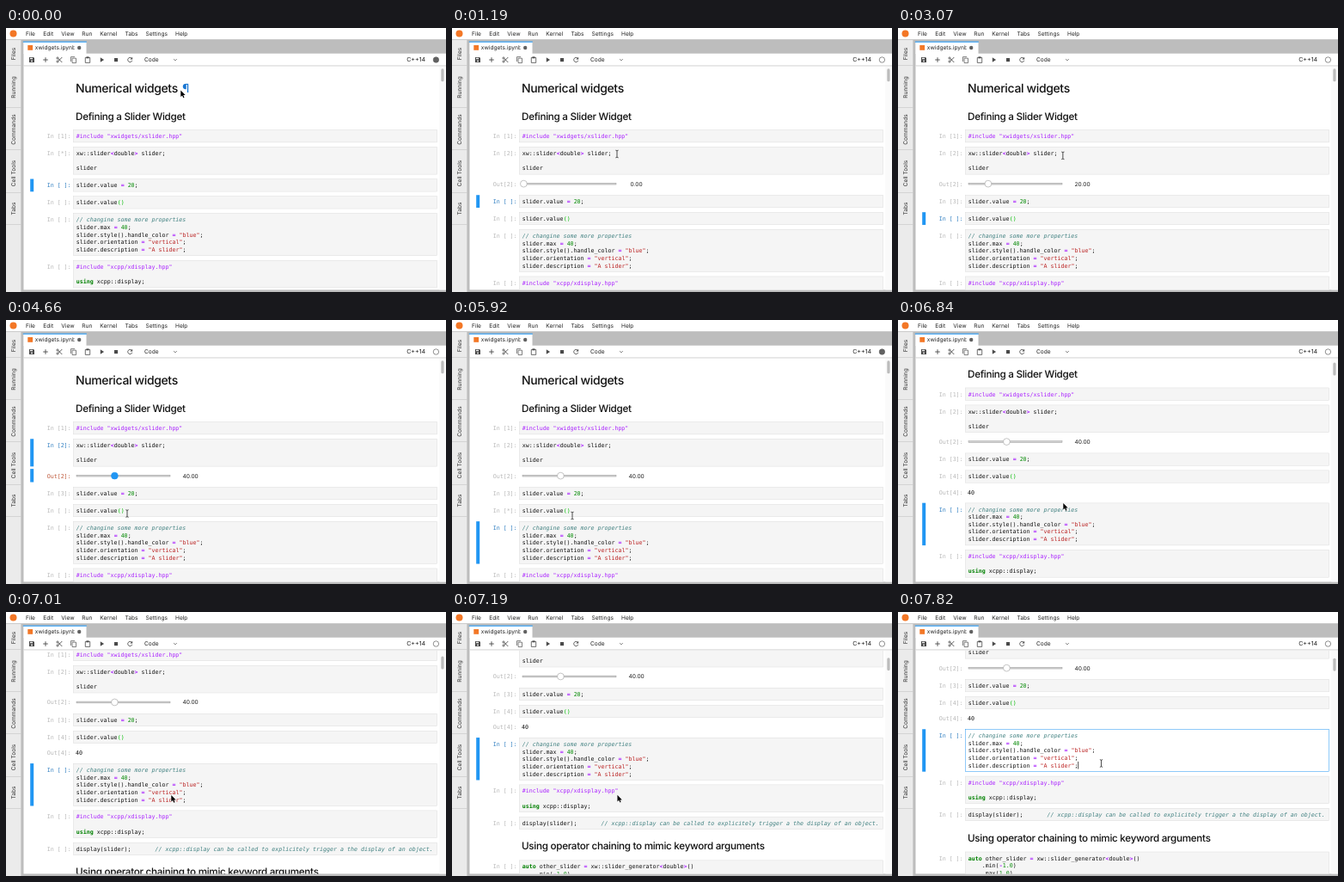
An HTML page with a canvas for the animation above (8000 ms loop, 512x307 px).

```html
<!DOCTYPE html>
<html lang="en">
<head>
<meta charset="utf-8">
<title>Notebook slider widget</title>
<style>
  html, body { margin: 0; width: 100%; height: 100%; overflow: hidden; background: #fff; }
  canvas { display: block; width: 512px; height: 307px; }
</style>
</head>
<body>
<canvas id="stage"></canvas>
<script>
const LOOP = 8000;
const UI = 'Inter, sans-serif', MONO = '"DejaVu Sans Mono", monospace';
const BLUE = '#2196f3', LINK = '#1976d2', BORDER = '#bdbdbd', PANEL = '#ebebeb', ICON = '#4a4a4a', ORANGE = '#f37726';
const CHAR = 3.995, LINE = 8.66, CODE_X = 81.7;

const canvas = document.getElementById('stage');
const ctx = canvas.getContext('2d');
const ratio = window.devicePixelRatio || 1;
canvas.width = 512 * ratio;
canvas.height = 307 * ratio;
ctx.scale(ratio, ratio);
ctx.textRendering = 'geometricPrecision';

// Each key is [time, ...values]; equal times make a jump.
const CURSOR = [
  [0, 203.3, 72.5], [650, 203.3, 72.5], [650, 201, 92], [740, 194, 135], [830, 192, 146.5],
  [3070, 192, 146.5], [3070, 192, 148.3], [3300, 160, 162], [3500, 118, 178], [3640, 104.5, 181.5],
  [3820, 104.5, 181.5], [4120, 127, 181], [4240, 136, 180],
  [4540, 136, 180], [4600, 138, 205], [4660, 141, 225], [4780, 141, 228.3], [4900, 140, 227.5],
  [6100, 140, 227.5], [6330, 192.3, 213], [7190, 192.3, 213], [7460, 236.5, 177],
  [7520, 236.5, 177], [7580, 236.5, 176]
];
const SCROLL = [[0, 0], [6690, 0], [6690, 7], [7010, 76], [7250, 116]];
const VALUE = [[0, 0], [2390, 0], [2390, 20], [3820, 20], [4120, 40]];

function track(keys, t) {
  let i = keys.length - 1;
  while (i && keys[i][0] > t) i--;
  const a = keys[i], b = keys[i + 1];
  if (!b) return a.slice(1);
  const k = (t - a[0]) / (b[0] - a[0]);
  return a.slice(1).map((v, n) => v + (b[n + 1] - v) * k);
}

const between = (t, a, b) => t >= a && t < b;

// The value of the last [start, value] pair that has begun.
const current = (t, ...steps) => steps.filter(s => s[0] <= t).pop()[1];

function text(str, x, y, { size = 6.6, font = UI, color = '#212121', style = '', align = 'left', spacing = 0 } = {}) {
  ctx.font = `${style} ${size}px ${font}`;
  ctx.letterSpacing = spacing * size + 'px';
  ctx.fillStyle = color;
  ctx.textAlign = align;
  ctx.fillText(str, x, y);
}

function mono(str, x, y, color, style, align) {
  text(str, x, y, { size: 6.635, font: MONO, color, style, align });
}

function rect(x, y, w, h, fill, stroke) {
  if (fill) { ctx.fillStyle = fill; ctx.fillRect(x, y, w, h); }
  if (stroke) { ctx.strokeStyle = stroke; ctx.lineWidth = 0.5; ctx.strokeRect(x, y, w, h); }
}

function disc(x, y, r, fill, stroke, width = 0.6) {
  ctx.beginPath();
  ctx.arc(x, y, r, 0, 2 * Math.PI);
  if (fill) { ctx.fillStyle = fill; ctx.fill(); }
  if (stroke) { ctx.strokeStyle = stroke; ctx.lineWidth = width; ctx.stroke(); }
}

function shape(x, y, d, { fill, stroke, width = 0.9 }) {
  const path = new Path2D(d);
  ctx.save();
  ctx.translate(x, y);
  if (stroke) { ctx.strokeStyle = stroke; ctx.lineWidth = width; ctx.stroke(path); }
  if (fill) { ctx.fillStyle = fill; ctx.fill(path); }
  ctx.restore();
}

const TOKENS = [
  [/\/\/.*/, '#408080', 'italic'],
  [/#include.*/, '#aa22ff'],
  [/"[^"]*"/, '#ba2121'],
  [/\b(?:using|auto)\b/, '#008000', 'bold'],
  [/\b\d+(?:\.\d+)?/, '#008800'],
  [/[=<>-]/, '#aa22ff', 'bold'],
  [/(?<=\.value)\(\)/, '#00bb00']
];
const SCANNER = new RegExp(TOKENS.map(k => `(${k[0].source})`).join('|'), 'g');

function codeLine(line, y) {
  const put = (str, col, color = '#111', style = '') => mono(str, CODE_X + col * CHAR, y, color, style);
  let end = 0;
  for (const m of line.matchAll(SCANNER)) {
    const [, color, style] = TOKENS[m.slice(1).findIndex(g => g !== undefined)];
    put(line.slice(end, m.index), end);
    put(m[0], m.index, color, style);
    end = m.index + m[0].length;
  }
  put(line.slice(end), end);
}

const CELLS = [
  ['#include "xwidgets/xslider.hpp"'],
  ['xw::slider<double> slider;', '', 'slider'],
  ['slider.value = 20;'],
  ['slider.value()'],
  ['// changine some more properties', 'slider.max = 40;', 'slider.style().handle_color = "blue";',
    'slider.orientation = "vertical";', 'slider.description = "A slider";'],
  ['#include "xcpp/xdisplay.hpp"', '', 'using xcpp::display;'],
  ['display(slider);       // xcpp::display can be called to explicitely trigger a the display of an object.'],
  ['auto other_slider = xw::slider_generator<double>()', '    .min(-1.0)', '    .max(1.0)', '    .finalize();']
];

function drawSlider(t, y) {
  const value = track(VALUE, t)[0];
  const hot = between(t, 3600, 5200);
  rect(82, y - 0.9, 109, 1.8, '#d0d0d0', '#9e9e9e');
  disc(83.4 + 1.075 * value, y, 3.9, hot ? BLUE : '#fff', hot ? BLUE : '#9e9e9e');
  text(value.toFixed(2), 214.6, y + 2.5, { align: 'center' });
}

function heading(str, y, size) {
  text(str, 81, y, { size, color: '#111', style: '500', spacing: -0.026 });
}

function drawNotebook(t) {
  const selected = current(t, [0, 3], [2300, 4], [3820, 2], [5200, 4], [5920, 5]);
  const editing = between(t, 5200, 5920) || t >= 7820;
  const caret = between(t, 5200, 5650) || t >= 7820;
  const counts = {
    1: '1',
    2: current(t, [0, '*'], [1190, '2']),
    3: current(t, [0, ' '], [2300, '*'], [2390, '3']),
    4: current(t, [0, ' '], [5920, '*'], [6100, '4'])
  };
  const outputs = {};
  if (t >= 1190) outputs[2] = { height: 18.7, draw: y => drawSlider(t, y) };
  if (t >= 6100) outputs[4] = { height: 18.1, draw: y => mono('40', CODE_X - 0.7, y + 2.4, '#111') };

  ctx.save();
  ctx.beginPath();
  ctx.rect(20.5, 45, 491.5, 259.4);
  ctx.clip();
  ctx.translate(0, -track(SCROLL, t)[0]);

  heading('Numerical widgets', 75.2, 14);
  if (t < 650) text('¶', 205, 75.2, { size: 14, color: LINK });
  heading('Defining a Slider Widget', 106.9, 11.7);

  let y = 118.3;
  CELLS.forEach((lines, i) => {
    const id = i + 1, active = id === selected, edit = active && editing;
    const height = lines.length * LINE + 6.1;
    const out = outputs[id];
    if (id === 8) {
      heading('Using operator chaining to mimic keyword arguments', y + 18.5, 11.7);
      y += 30.7;
    }
    if (active) rect(28.2, y, 4, height, BLUE);
    mono(`In [${counts[id] || ' '}]:`, 75.6, y + 9.8, active ? '#307fc1' : '#b8b8b8', '', 'right');
    rect(78.3, y + 0.2, 423.4, height - 0.4, edit ? '#fff' : '#f5f5f5', edit ? BLUE : '#dcdcdc');
    lines.forEach((line, n) => codeLine(line, y + 9.8 + n * LINE));
    if (edit && caret) {
      const last = lines.length - 1;
      rect(CODE_X + lines[last].length * CHAR - 0.1, y + 3 + last * LINE, 0.7, LINE, '#000');
    }
    y += height;
    if (out) {
      const mid = y + 10.8;
      if (active) rect(28.2, y + 2.8, 4, 15.4, BLUE);
      mono(`Out[${counts[id]}]:`, 75.6, mid + 2.4, active ? '#bf5b3d' : '#b8b8b8', '', 'right');
      out.draw(mid);
      y += out.height;
    }
    y += 5.2;
  });
  ctx.restore();

  rect(504.3, 45, 7.7, 259.4, '#fafafa');
  ctx.fillStyle = '#bcbcbc';
  ctx.beginPath();
  ctx.roundRect(506.3, 47.3 + track(SCROLL, t)[0] * 0.055, 3.3, 15, 1.6);
  ctx.fill();
}

const MENU = { File: 23, Edit: 43.3, View: 64.3, Run: 88.3, Kernel: 109.3, Tabs: 138.5, Settings: 162.5, Help: 197 };
const SIDE = { Files: [30, 43.5], Running: [69, 92.5], Commands: [118, 141.5], 'Cell Tools': [169, 191.5], Tabs: [210, 228.5] };

function drawToolbar(busy) {
  const y = 37, line = { stroke: ICON }, solid = { fill: ICON };
  shape(30, y, 'M-3-3H2L3-2V3H-3Z', solid);
  rect(28, 34.8, 3, 1.4, '#fff');
  disc(30, 38.4, 0.9, '#fff');
  shape(46, y, 'M-2.8 0H2.8M0-2.8V2.8', line);
  shape(62.3, y, 'M-2-2L3 3M-2 2L3-3', line);
  disc(60, 35, 1.1, '#fff', ICON, 0.8);
  disc(60, 39, 1.1, '#fff', ICON, 0.8);
  shape(78.5, y, 'M-3 2V-3.4H1.6M-1.4-1.8H3V3.6H-1.4Z', { stroke: ICON, width: 0.7 });
  shape(95, y, 'M-2.7-2.6H2.7V3.4H-2.7Z', { stroke: ICON, width: 0.8 });
  rect(93.5, 33.4, 3, 1.9, ICON);
  shape(111.5, y, 'M-1.7-2.7L2.6 0L-1.7 2.7Z', solid);
  rect(126, 35, 4.1, 4.1, ICON);
  shape(144.2, y, 'M2-1.8A2.6 2.6 0 1 0 2.6.8', line);
  shape(144.2, y, 'M3-3.2V-.4H.2Z', solid);
  text('Code', 161, 39.4);
  shape(197, y, 'M-1.8-.9L0 .9L1.8-.9', { stroke: ICON, width: 0.7 });
  text('C++14', 488, 39.4, { size: 7, align: 'right' });
  disc(500.4, y, 3.2, busy ? '#616161' : '#fff', '#616161', 0.7);
}

function drawShell(t) {
  rect(0, 0, 512, 307, BORDER);
  rect(0, 0, 512, 13.4, '#fff');
  rect(0, 13.3, 512, 0.6, BORDER);
  disc(8.5, 6.5, 4, ORANGE);
  for (const name in MENU) text(name, MENU[name], 9);

  rect(0, 13.9, 17.4, 293.1, PANEL);
  for (const name in SIDE) {
    const [mid, edge] = SIDE[name];
    rect(0, edge, 17.4, 0.5, BORDER);
    ctx.save();
    ctx.translate(11.4, mid);
    ctx.rotate(-Math.PI / 2);
    text(name, 0, 0, { align: 'center', color: '#333' });
    ctx.restore();
  }

  rect(20.5, 29.7, 491.5, 274.7, '#fff');
  rect(20.3, 16, 73.2, 14, '#fff');
  rect(19.8, 15.6, 74, 1.1, BLUE);
  rect(25.3, 20, 5.8, 5.8, ORANGE);
  ctx.save();
  ctx.beginPath();
  ctx.rect(33, 17, 46.6, 12);
  ctx.clip();
  text('xwidgets.ipynb', 33.8, 25.4);
  ctx.restore();
  disc(85.2, 23, 2.2, '#616161');

  drawToolbar(t < 1190 || between(t, 2300, 2390) || between(t, 5920, 6100));
  rect(20.5, 43.6, 491.5, 0.6, BORDER);
  rect(20.5, 44.2, 491.5, 0.7, '#e8e8e8');
}

function drawCursor(t) {
  const [x, y] = track(CURSOR, t);
  const beam = between(t, 740, 3380) || between(t, 4640, 6180) || t >= 7400;
  if (beam) {
    shape(x, y, 'M-1.6-4.3Q0-4.3 0-3.3V3.3Q0 4.3-1.6 4.3M1.6-4.3Q0-4.3 0-3.3M0 3.3Q0 4.3 1.6 4.3', { stroke: '#222', width: 0.8 });
  } else {
    shape(x, y, 'M0 0V7.6L1.8 6L3 8.7L4.2 8.2L3 5.6H5.4Z', { fill: '#000', stroke: '#fff', width: 1 });
  }
}

function frame(now) {
  const t = now % LOOP;
  drawShell(t);
  drawNotebook(t);
  drawCursor(t);
  requestAnimationFrame(frame);
}
requestAnimationFrame(frame);
</script>
</body>
</html>
```
